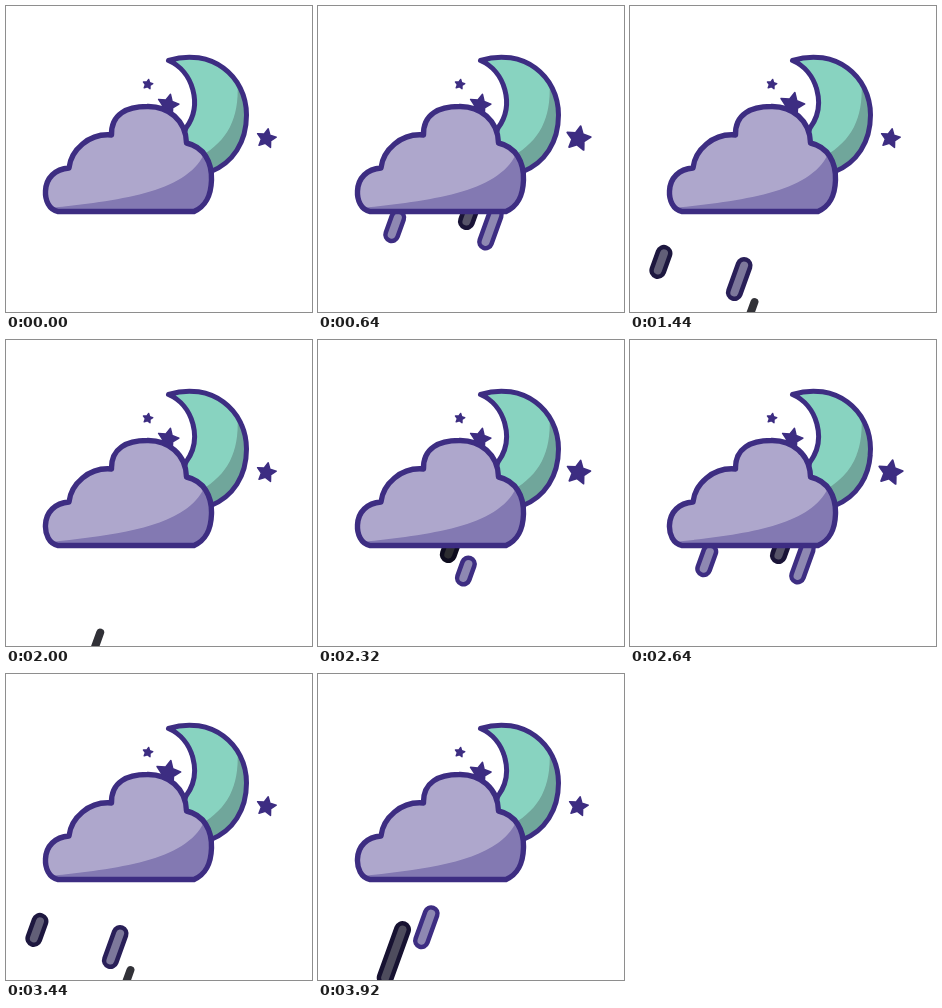
An HTML page for the animation above (4000 ms loop, 306 px wide and 306 px high).

```html
<!DOCTYPE html>
<html lang="en">
<head>
<meta charset="utf-8">
<title>Night rain</title>
<style>
  html, body { margin: 0; width: 100%; height: 100%; overflow: hidden; background: #fff; }
  svg { display: block; width: 100vw; height: 100vh; }
  .line { fill: none; stroke: #3d2d82; stroke-width: 5; stroke-linejoin: round; }
  #stars path { fill: #3d2d82; stroke: #3d2d82; stroke-width: 1.4; stroke-linejoin: round; }
  #rain line { stroke-linecap: round; }
</style>
</head>
<body>
<svg viewBox="0 0 306 306" xmlns="http://www.w3.org/2000/svg">
  <defs>
    <path id="moon" d="M162.500 54.500C205 41 240.500 70 240.500 109C240.500 136 227 157 204 166L174 140L180 122C197 99 187 65 162.500 54.500Z"/>
    <path id="cloud" d="M52 205.500C43 204 39 194 39.500 185C40 172 49 163 63 162C65 144 83 127 105.500 129C105 108 121 100.500 141 100.500C162 100 180 114 180.500 137C198 141 206 156 205.500 174C205 190 200 200 188 205.500Z"/>
    <clipPath id="inMoon"><use href="#moon"/></clipPath>
    <clipPath id="inCloud"><use href="#cloud"/></clipPath>
  </defs>
  <g id="stars"></g>
  <use href="#moon" fill="#88d3c0"/>
  <path d="M231 70C235 112 222 136 190 153V172H246V70Z" fill="#70a69b" clip-path="url(#inMoon)"/>
  <use href="#moon" class="line"/>
  <g id="rain"></g>
  <use href="#cloud" fill="#aea7cc"/>
  <path d="M44 202C110 195 180 187 198 148L214 150V210H44Z" fill="#8379b2" clip-path="url(#inCloud)"/>
  <use href="#cloud" class="line" style="stroke-width:5.4"/>
</svg>
<script>
const NS = 'http://www.w3.org/2000/svg';
const LOOP = 4000, STEP = 80, FALL = 1000, TWINKLE = 2000;
const BASE = 207, SLANT = 0.36;

const clamp = v => Math.max(0, Math.min(1, v));
const mod = (a, n) => ((a % n) + n) % n;

function add(parent, tag, attrs) {
  const el = document.createElementNS(NS, tag);
  set(el, attrs);
  document.getElementById(parent).appendChild(el);
  return el;
}

function set(el, attrs) {
  for (const key in attrs) el.setAttribute(key, attrs[key]);
}

function mix(a, b, k) {
  return 'rgb(' + a.map((v, i) => Math.round(v + (b[i] - v) * k)) + ')';
}

function starPath(r) {
  const pts = [];
  for (let i = 0; i < 10; i++) {
    const a = i * Math.PI / 5 - Math.PI / 2;
    const d = i % 2 ? r * 0.5 : r;
    pts.push((d * Math.cos(a)).toFixed(2) + ' ' + (d * Math.sin(a)).toFixed(2));
  }
  return 'M' + pts.join('L') + 'Z';
}

// grow: added scale at the peak; start: when the pulse begins
const stars = [
  { x: 162, y: 99, r: 11, turn: 13, grow: 0.16, start: 1000 },
  { x: 141.8, y: 78.3, r: 5, turn: 10, grow: 0, start: 0 },
  { x: 260.3, y: 132.5, r: 10, turn: 11, grow: 0.32, start: 0 }
];
for (const s of stars) s.el = add('stars', 'path', { d: starPath(s.r) });

// x: where it leaves the cloud, at: when, half: half height, speed: px per ms
const drops = [
  { x: 48.5, at: 346, half: 8.5, speed: 0.52, life: 138 },
  { x: 81.5, at: 616, half: 8.5, speed: 0.55, life: 170 },
  { x: 151.5, at: 640, half: 8.5, speed: 0.55, life: 170 },
  { x: 178, at: 612, half: 13.5, speed: 0.55, life: 170 },
  { x: 133, at: 330, half: 13.5, speed: 0.6, life: 176 },
  { x: 156.5, at: 280, half: 7, speed: 0.6, life: 165 },
  { x: 125, at: 850, half: 13.5, speed: 0.66, life: 154 },
  { x: 102, at: 810, half: 24, speed: 0.66, life: 138 }
];
for (const d of drops) {
  d.rim = add('rain', 'line', { 'stroke-width': 17 });
  d.core = add('rain', 'line', { 'stroke-width': 8 });
}

function drawStar(s, t) {
  const p = mod(t - s.start, TWINKLE) / 1000;
  const pulse = p < 1 ? Math.sin(Math.PI * p) ** 2 : 0;
  set(s.el, { transform: `translate(${s.x} ${s.y}) rotate(${s.turn}) scale(${1 + s.grow * pulse})` });
}

function drawDrop(d, t) {
  const age = mod(t - d.at + 20, FALL) - 20;
  const shown = t >= STEP && age < d.life;
  // drops darken as they appear and as they fade away
  const fadeIn = clamp((15 - age) / 20);
  const fadeOut = Math.sqrt(clamp((age - d.life + 80) / 80));
  const dark = Math.max(fadeIn, fadeOut);
  // the rim is lost just before the core
  d.core.style.display = shown ? '' : 'none';
  d.rim.style.display = shown && fadeOut < 0.95 ? '' : 'none';
  if (!shown) return;

  const dy = age * d.speed;
  const x = d.x - SLANT * dy, y = BASE + dy;
  const ends = {
    x1: x + SLANT * d.half, y1: y - d.half,
    x2: x - SLANT * d.half, y2: y + d.half
  };
  set(d.rim, { ...ends, stroke: mix([61, 45, 130], [14, 12, 30], dark) });
  set(d.core, { ...ends, stroke: mix([142, 136, 178], [44, 44, 48], dark * dark) });
}

function draw(now) {
  const t = Math.floor(mod(now, LOOP) / STEP) * STEP;
  stars.forEach(s => drawStar(s, t));
  drops.forEach(d => drawDrop(d, t));
}

const begin = performance.now();
function tick() {
  draw(performance.now() - begin);
  requestAnimationFrame(tick);
}
tick();
</script>
</body>
</html>
```
